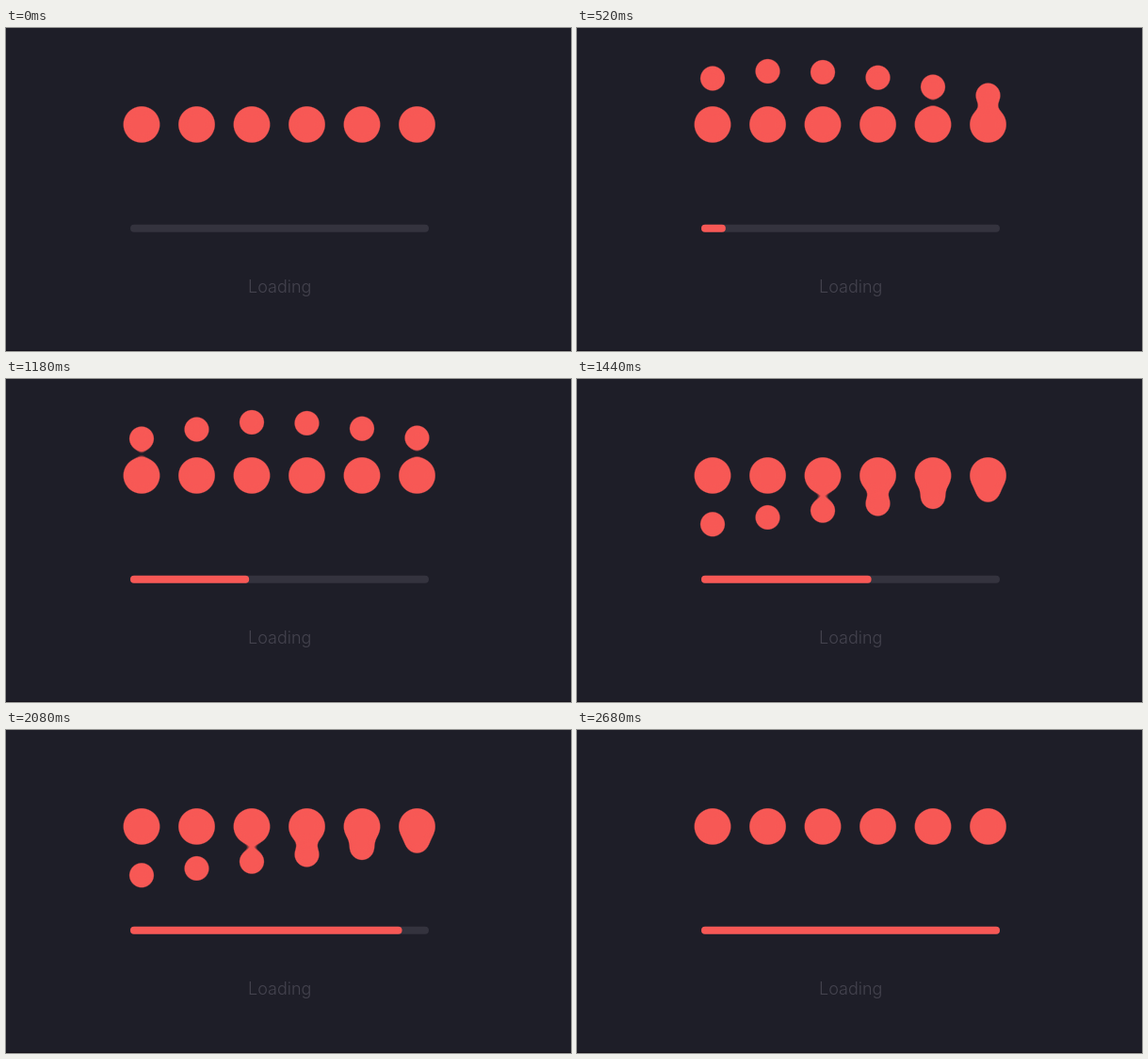
An HTML page that plays this animation: 600x343 px, repeating every 2.94 s.

```html
<!DOCTYPE html>
<html lang="en">
<head>
<meta charset="utf-8">
<title>Loading</title>
<style>
  html, body { margin: 0; width: 100%; height: 100%; overflow: hidden; background: #1e1e28; }
  svg { display: block; width: 600px; height: 343px; }
  text { font: 300 18px Inter, sans-serif; fill: #44434e; text-anchor: middle; }
</style>
</head>
<body>
<svg viewBox="0 0 600 343">
  <defs>
    <filter id="goo" filterUnits="userSpaceOnUse" x="0" y="0" width="600" height="343" color-interpolation-filters="sRGB">
      <feGaussianBlur stdDeviation="5"/>
      <feColorMatrix values="1 0 0 0 0  0 1 0 0 0  0 0 1 0 0  0 0 0 10 -4"/>
    </filter>
  </defs>
  <rect width="600" height="343" fill="#1e1e28"/>
  <rect y="342" width="600" height="1" fill="#15111a"/>
  <g id="dots" fill="#f75855" filter="url(#goo)"></g>
  <rect x="132" y="208.7" width="317" height="8" rx="4" fill="#34333e"/>
  <rect id="bar" x="132" y="208.7" width="0" height="8" rx="4" fill="#f75855"/>
  <text x="290.7" y="281">Loading</text>
</svg>
<script>
const LOOP = 2940, START = 20, STAGGER = 20, PERIOD = 640, CYCLES = 4;
const COUNT = 6, MID = 102.5;
const BAR_START = 95, BAR_TIME = 2520;

// One bounce: [time in ms, vertical offset]
const PATH = [
  [0, 0], [140, 51.5], [160, 57], [180, 50], [200, 41], [320, 0],
  [400, -30.5], [420, -39.5], [440, -49.5], [460, -55.5], [480, -57],
  [500, -49.5], [520, -39.5], [640, 0]
];

const dots = document.getElementById('dots');
const bar = document.getElementById('bar');

function addCircle(x, r) {
  const c = document.createElementNS('http://www.w3.org/2000/svg', 'circle');
  c.setAttribute('cx', x);
  c.setAttribute('cy', MID);
  c.setAttribute('r', r);
  return dots.appendChild(c);
}

const balls = Array.from({ length: COUNT }, (_, i) => {
  const x = 144 + 58.5 * i;
  addCircle(x, 19.3);
  return addCircle(x, 13.2);
});

function offset(ms) {
  if (ms <= 0 || ms >= PERIOD * CYCLES) return 0;
  const p = ms % PERIOD;
  const k = PATH.findIndex(point => point[0] > p);
  const [t0, y0] = PATH[k - 1], [t1, y1] = PATH[k];
  return y0 + (y1 - y0) * (p - t0) / (t1 - t0);
}

// cubic-bezier(.42, 0, .58, 1)
function easeInOut(u) {
  let lo = 0, hi = 1, s = 0.5;
  for (let i = 0; i < 20; i++) {
    s = (lo + hi) / 2;
    const r = 1 - s;
    const x = 1.26 * s * r * r + 1.74 * s * s * r + s * s * s;
    if (x < u) lo = s; else hi = s;
  }
  return s * s * (3 - 2 * s);
}

function draw(now) {
  const t = now % LOOP;
  balls.forEach((ball, i) => {
    ball.setAttribute('cy', MID + offset(t - START - STAGGER * i));
  });
  const u = Math.min((t - BAR_START) / BAR_TIME, 1);
  bar.setAttribute('width', u > 0 ? 8 + 309 * easeInOut(u) : 0);
}

const begin = performance.now();
function tick() {
  draw(performance.now() - begin);
  requestAnimationFrame(tick);
}
tick();
</script>
</body>
</html>
```
